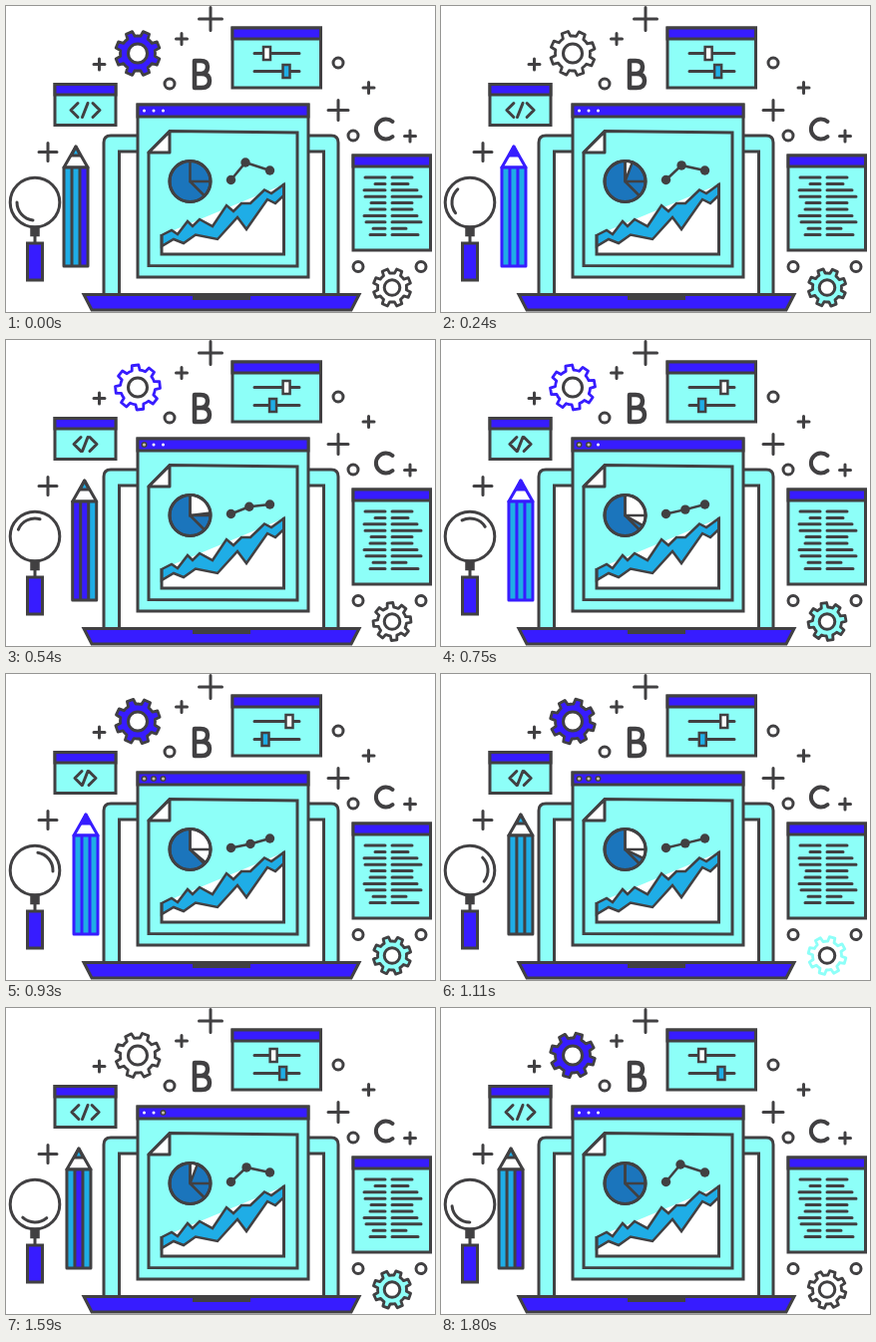
An HTML page for the animation above (1.83 s loop, 430 by 307 pixels).

```html
<!DOCTYPE html>
<html lang="en">
<head>
<meta charset="utf-8">
<title>Workspace</title>
<style>
html, body { margin: 0; width: 100%; height: 100%; overflow: hidden; background: #fff; }
svg { display: block; width: 100vw; height: 100vh; }
.ink { stroke: #414042; stroke-width: 3; fill: none; }
.round { stroke-linecap: round; stroke-linejoin: round; }
.aqua { fill: #8dfff8; }
.indigo { fill: #371cff; }
.sky { fill: #1fade6; }
.white { fill: #fff; }
.dark { fill: #414042; }
.thin { stroke-width: 2.5; }
</style>
</head>
<body>
<svg viewBox="0 0 430 307">
  <g class="ink">
    <path class="aqua" d="M98 290V137Q98 130 105 130H326Q333 130 333 137V290Z"/>
    <path class="white" d="M113.500 290V146H318.500V290"/>
    <path class="indigo" d="M78 289.500H354L346 305H86Z"/>
    <path class="dark" stroke="none" d="M187 290H245V295H187Z"/>

    <path class="aqua" d="M132 99H303V272H132Z"/>
    <path class="indigo" d="M132 99H303V111H132Z"/>
    <g id="dots" stroke-width="1.500"></g>
    <path d="M164 125.500L292 127V261L143 260.500V147Z"/>
    <path class="white" stroke-linejoin="round" d="M164 126V147H143Z"/>

    <circle cx="184.500" cy="176" r="20.500" fill="#1b75bc"/>
    <path id="slice" class="white thin"/>
    <path class="thin" d="M184.500 155.500V176H205M184.500 176L199 190.500"/>
    <circle cx="184.500" cy="176" r="20.500"/>

    <path class="white" d="M156 230V249H278.500V179Z" stroke="none"/>
    <path class="sky thin" d="M156 230L166 225L172 229L182 216L187 221L194 214L207 221L221 200L228 206L236 198H245L259 184.500L266 188L278.500 179V190L270 198L262 194L241 224L232 212L212 234L190 229.500L178 238L168 234L156 241Z"/>
    <path d="M156 229V249H278.500V178"/>

    <path id="link" class="thin"/>
    <g class="dark" stroke="none">
      <circle cx="225.500" cy="174.500" r="4.700"/>
      <circle id="node" r="4.700"/>
      <circle cx="264.500" cy="165" r="4.700"/>
    </g>

    <path class="aqua" d="M49 78.500H110V119.500H49Z"/>
    <path class="indigo" d="M49 78.500H110V89H49Z"/>
    <path id="code" class="round"/>

    <path class="aqua" d="M227 22H315.500V82H227Z"/>
    <path class="indigo" d="M227 22H315.500V33H227Z"/>
    <path class="round" d="M249 47.500H294M249 65.500H294"/>
    <rect id="upper" class="white thin" y="41" width="7" height="13"/>
    <rect id="lower" class="sky thin" y="59" width="7" height="13"/>

    <path class="aqua" d="M348 150H425.500V245H348Z"/>
    <path class="indigo" d="M348 150H425.500V161H348Z"/>
    <path id="lines" class="round"/>

    <path id="pluses" class="round"/>
    <g id="rings"></g>
    <path class="round" stroke-width="4.500" d="M189 55V82H196Q204 82 204 75Q204 68 196 68H189M196 68Q202 67 202 61Q202 55 195 55H189"/>
    <path class="round" stroke-width="4" d="M387.500 116A10 10 0 1 0 387.500 131"/>

    <circle class="white" cx="29" cy="197" r="24.800"/>
    <path id="glare" class="round" d="M11 197A18 18 0 0 0 27 214.900"/>
    <path d="M29 229V238"/>
    <path class="dark thin" d="M25.500 222H32.500V230H25.500Z"/>
    <path class="indigo" d="M21.500 238H36.500V275H21.500Z"/>

    <g id="pencil" stroke-linejoin="round">
      <path class="white" d="M58 162L70 141L82 162Z"/>
      <path id="nib" d="M65.500 150L70 141L74.500 150Z"/>
      <g id="stripes" stroke="none"></g>
      <path d="M58 162H82V261H58ZM66 162V261M74 162V261"/>
    </g>
    <g id="bigGear"></g>
    <g id="smallGear"></g>
  </g>
</svg>
<script>
const LOOP = 1830, STEP = 30;
const INK = '#414042', INDIGO = '#371cff', AQUA = '#8dfff8', SKY = '#1fade6', WHITE = '#fff';
const byId = id => document.getElementById(id);

function set(el, attrs) {
  for (const key in attrs) el.setAttribute(key, attrs[key]);
  return el;
}

function add(parent, tag, attrs) {
  const el = document.createElementNS('http://www.w3.org/2000/svg', tag);
  parent.append(el);
  return set(el, attrs);
}

const polar = (r, deg) => {
  const a = deg * Math.PI / 180;
  return (r * Math.cos(a)).toFixed(2) + ' ' + (r * Math.sin(a)).toFixed(2);
};

function gearPath(outer, root, teeth = 8) {
  const pitch = 360 / teeth;
  let d = '';
  for (let i = 0; i < teeth; i++) {
    const a = i * pitch;
    d += (i ? 'L' : 'M') + polar(root, a - pitch * 0.29) + 'L' + polar(outer, a - pitch * 0.19) +
      'L' + polar(outer, a + pitch * 0.19) + 'L' + polar(root, a + pitch * 0.29) +
      `A${root} ${root} 0 0 1 ` + polar(root, a + pitch * 0.71);
  }
  return d + 'Z';
}

function makeGear(id, x, y, outer, root, hole) {
  const group = set(byId(id), { transform: `translate(${x} ${y})` });
  const rim = add(group, 'path', { d: gearPath(outer, root), 'stroke-linejoin': 'round', 'stroke-width': 2.8 });
  add(group, 'circle', { r: hole, fill: WHITE });
  return rim;
}

const bigRim = makeGear('bigGear', 132, 47.5, 22.5, 17.5, 9.5);
const smallRim = makeGear('smallGear', 387, 282.5, 19, 14.5, 7.8);

const dots = [138.5, 148, 157.5].map(cx => add(byId('dots'), 'circle', { cx, cy: 105 }));
const stripes = [58, 66, 74].map(x => add(byId('stripes'), 'rect', { x, y: 162, width: 8, height: 99 }));

for (const [cx, cy] of [[164, 78], [333, 57], [348, 130], [353, 261.5], [416, 261.5]])
  add(byId('rings'), 'circle', { cx, cy, r: 5 });

set(byId('pluses'), {
  d: [[205, 13, 11.5], [176, 33, 5.5], [93.5, 58.5, 5.5], [42, 146.5, 9], [333, 104.5, 10], [363.5, 82, 5.5], [405, 130.5, 5.5]]
    .map(([x, y, r]) => `M${x - r} ${y}H${x + r}M${x} ${y - r}V${y + r}`).join('')
});

set(byId('lines'), {
  d: [[360, 407], [370, 403], [359, 412], [360, 416], [366, 407], [365, 407], [359, 412], [361, 416], [368, 401], [365, 413]]
    .map(([left, right], i) => `M${left} ${172 + i * 6.4}H380M387 ${172 + i * 6.4}H${right}`).join('')
});

// Picks the value of the last entry that has started.
const phase = (t, list) => list.filter(([start]) => t >= start).pop()[1];

const bigLook = [[0, [INDIGO, INK]], [150, [WHITE, INK]], [420, [WHITE, INDIGO]], [930, [INDIGO, INK]], [1260, [WHITE, INK]], [1620, [INDIGO, INK]]];
const smallLook = [[0, [WHITE, INK]], [150, [AQUA, INK]], [420, [WHITE, INK]], [660, [AQUA, INK]], [960, [WHITE, AQUA]], [1260, [AQUA, INK]], [1620, [WHITE, INK]]];
const pencilLook = [
  [0, [INK, SKY, SKY, INDIGO]], [150, [INDIGO, SKY, SKY, SKY]], [420, [INK, INDIGO, INDIGO, SKY]],
  [660, [INDIGO, SKY, SKY, SKY]], [960, [INK, SKY, SKY, SKY]], [1260, [INK, SKY, INDIGO, SKY]], [1620, [INK, SKY, SKY, INDIGO]]
];

function draw(t) {
  const u = t / LOOP;
  const swing = (1 - Math.cos(2 * Math.PI * u)) / 2;
  const quick = 1 - (1 - swing) ** 2;
  const medium = 1 - (1 - swing) ** 1.4;
  const turn = 360 * u;

  for (const [rim, look] of [[bigRim, bigLook], [smallRim, smallLook]]) {
    const [fill, stroke] = phase(t, look);
    set(rim, { fill, stroke, transform: `rotate(${22.5 + turn})` });
  }

  const [outline, ...fills] = phase(t, pencilLook);
  set(byId('pencil'), { transform: `translate(${10 * quick} 0)`, stroke: outline });
  set(byId('nib'), { fill: outline === INK ? SKY : INDIGO });
  stripes.forEach((s, i) => set(s, { fill: fills[i] }));

  set(byId('glare'), { transform: `rotate(${turn} 29 197)` });
  set(byId('upper'), { x: 258 + 22.5 * quick });
  set(byId('lower'), { x: 277.5 - 21 * swing });

  const x = 240 + 5 * medium, y = 157 + 13.5 * medium;
  set(byId('node'), { cx: x, cy: y });
  set(byId('link'), { d: `M225.5 174.5L${x} ${y}L264.5 165` });

  const shift = 4 * medium;
  set(byId('code'), {
    d: `M${72 + shift} 97.500L${65 + shift} 104.500L${72 + shift} 111.500` +
       `M${87 - shift} 97.500L${94 - shift} 104.500L${87 - shift} 111.500M82 97.500L76.500 111.500`
  });

  set(byId('slice'), {
    transform: 'translate(184.5 176)',
    d: swing > 0.001 ? `M0 0V-20.5A20.5 20.5 0 0 1 ${polar(20.5, 130 * swing - 90)}Z` : ''
  });

  dots.forEach((dot, i) => {
    const ringed = t >= 420 + i * 240 && t < 1290 + i * 240;
    set(dot, { r: ringed ? 2.3 : 1.5, fill: ringed ? '#c9c0a6' : WHITE, stroke: ringed ? INK : 'none' });
  });
}

const begin = performance.now();
function tick() {
  const t = (performance.now() - begin) % LOOP;
  draw(Math.floor(t / STEP) * STEP);
  requestAnimationFrame(tick);
}
tick();
</script>
</body>
</html>
```
